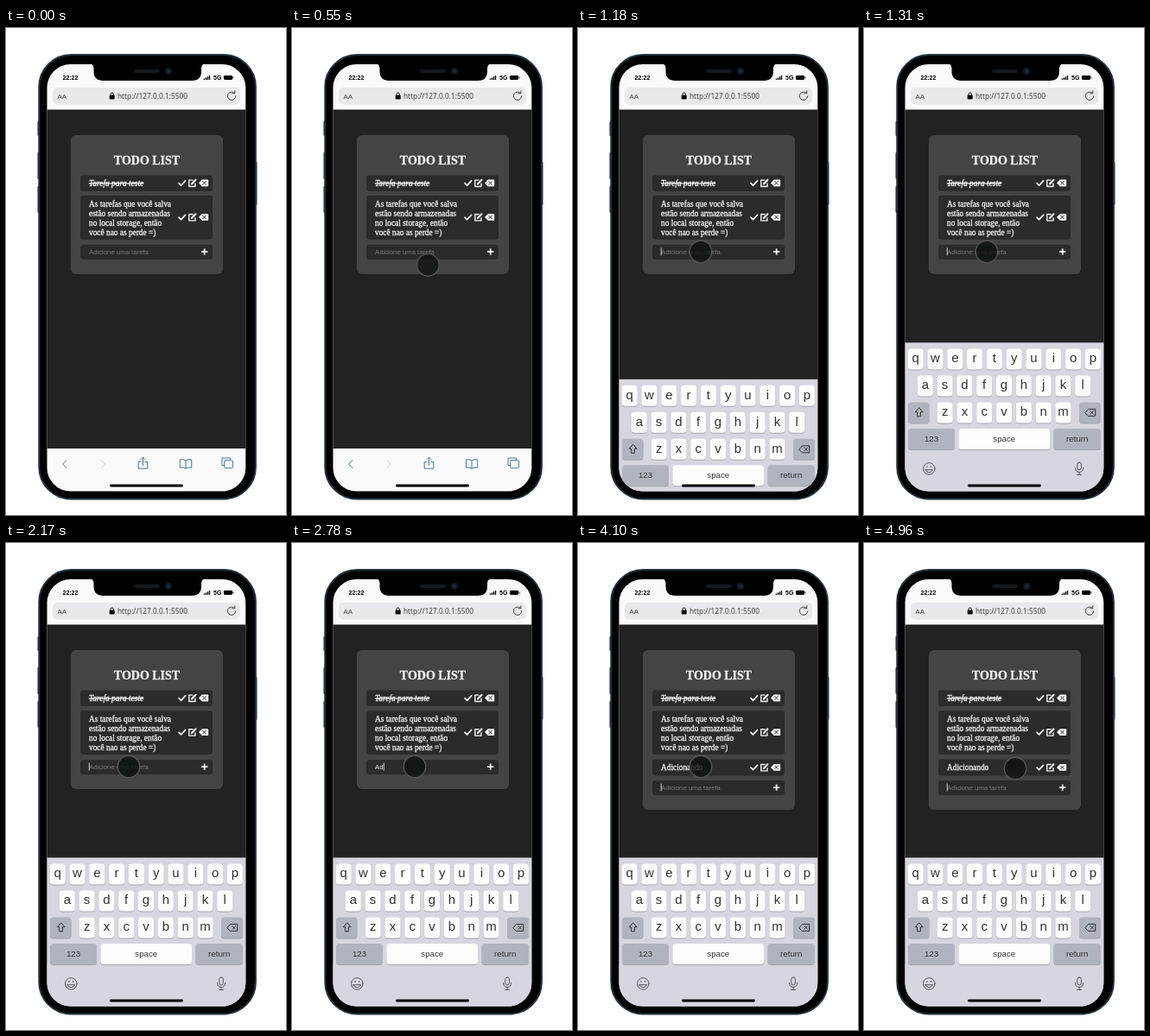
Recreate the animation shown at these times as an HTML page. Size 324 by 564 pixels, loop 5.04 s.

```html
<!DOCTYPE html>
<html lang="pt">
<head>
<meta charset="utf-8">
<style>
  html, body { margin: 0; width: 100%; height: 100%; overflow: hidden; background: #fff; }
  svg { display: block; }
  text { font-family: "Liberation Sans", Arial, sans-serif; }
  .serif { font: 9.35px "Liberation Serif", "Times New Roman", serif; fill: #f4f4f4; stroke: #f4f4f4; stroke-width: .28px; }
  .input { font-size: 7.75px; fill: #f0f0f0; }
  .mid { text-anchor: middle; }
  .line { fill: none; stroke-width: 1; stroke-linecap: round; stroke-linejoin: round; }
</style>
</head>
<body>
<svg width="324" height="564" viewBox="0 0 324 564">
  <defs>
    <clipPath id="screen"><rect x="47.5" y="42" width="229.8" height="494.5" rx="27"/></clipPath>
    <g id="actions" class="line" stroke="#f4f4f4">
      <path d="M200 .2l2.6 2.6 5-5.4" stroke-width="1.7"/>
      <path d="M216-3.4h-4.2v7.4h7.2V.8" stroke-width="1.4"/>
      <path d="M215 1l4.4-4.6" stroke-width="2.2"/>
      <path d="M223 0l3.8-3.9h6.4q1 0 1 1v5.8q0 1-1 1h-6.4z" fill="#f4f4f4" stroke="none"/>
      <path d="M227.8-1.7l3.4 3.4m0-3.4l-3.4 3.4" stroke="#2b2b2b"/>
    </g>
  </defs>

  <g fill="#22323d">
    <rect x="36.5" y="108" width="3" height="17" rx="1"/>
    <rect x="36.5" y="144" width="3" height="31" rx="1"/>
    <rect x="36.5" y="183" width="3" height="31" rx="1"/>
    <rect x="287.5" y="155" width="3" height="50" rx="1"/>
  </g>
  <rect x="38.3" y="31" width="250.6" height="514.5" rx="37" stroke="#22343f" stroke-width="2"/>

  <g clip-path="url(#screen)">
    <rect x="47" y="42" width="231" height="495" fill="#fafafa"/>
    <rect x="54" y="69" width="217" height="19.5" rx="5" fill="#e9e9eb"/>
    <text x="65.5" y="59.7" font-size="7" font-weight="bold">22:22</text>
    <text x="240" y="60" font-size="7" font-weight="bold">5G</text>
    <path d="M229.5 60v-1.5m2 1.5v-2.5m2 2.5v-3.7m2 3.7v-5" stroke="#111" stroke-width="1.4"/>
    <rect x="252" y="55" width="10" height="5" rx="1.2"/>
    <path d="M263 56.5v2" stroke="#111"/>
    <text x="59.5" y="81.7" font-size="8" fill="#444">AA</text>
    <rect x="119.7" y="77.8" width="6" height="4.7" rx=".8"/>
    <path class="line" d="M121 78v-1.3a1.7 1.7 0 0 1 3.4 0v1.3" stroke="#111"/>
    <text x="129" y="81.7" font-size="8.35" fill="#333" style="font-family:'Open Sans',sans-serif">http://127.0.0.1:5500</text>
    <path class="line" d="M264.3 75.3a4.7 4.7 0 1 0 1.5 3.5M264.8 72.8v3h-3" stroke="#444"/>

    <rect x="47" y="94.5" width="231" height="392.5" fill="#222"/>
    <rect id="panel" x="75" y="124" width="176" height="161" rx="6" fill="#444"/>
    <text class="serif mid" x="163" y="157.8" style="font-size:14px;font-weight:bold">TODO LIST</text>

    <g fill="#2b2b2b">
      <rect x="86" y="170.5" width="153" height="18.5" rx="3"/>
      <rect x="86" y="194" width="153" height="51" rx="3"/>
    </g>
    <text class="serif" x="96" y="182.8" style="font-style:italic;text-decoration:line-through">Tarefa para teste</text>
    <g id="note"></g>
    <use href="#actions" y="179.5"/>
    <use href="#actions" y="219.1"/>

    <g id="added">
      <rect x="86" y="250.5" width="153" height="19" rx="3" fill="#2b2b2b"/>
      <text class="serif" x="96" y="263">Adicionando</text>
      <use href="#actions" y="259.9"/>
    </g>
    <g id="field">
      <rect x="86" y="251" width="153" height="17" rx="3" fill="#2b2b2b"/>
      <text id="typed" class="input" x="96" y="261.7"></text>
      <rect id="caret" y="254.5" width=".9" height="9" fill="#e0e0e0"/>
      <path d="M226 259.1h7.4m-3.7-3.7v7.4" stroke="#f4f4f4" stroke-width="1.8"/>
    </g>

    <g class="line" stroke="#467b99">
      <path d="M70 500.5l-4.5 4.5 4.5 4.5"/>
      <path d="M110 500.5l4.5 4.5-4.5 4.5" stroke="#cdd3d8"/>
      <path d="M156 502.5h-2.8v7.7h10.6v-7.7h-2.8M158.5 506.5v-9.3m-2.5 2.4l2.5-2.5 2.5 2.5"/>
      <path d="M208 501q-3-2.2-6.7-1.2v9.4q4-1 6.7 1 2.7-2 6.7-1v-9.4q-3.7-1-6.7 1.2v9"/>
      <path d="M252.5 506.5h-2.5v-8.5h9.5v2.5"/>
      <rect x="252.7" y="500.7" width="9.8" height="9" rx="1"/>
    </g>

    <g id="keyboard">
      <rect x="47" y="365" width="231" height="183" fill="#d5d6df"/>
      <g id="keys"></g>
      <g class="line" stroke="#333">
        <path d="M63.5 440.7l-4.2 4.7h2.3v5h3.8v-5h2.3z"/>
        <path d="M256 446l3.7-4h8v8h-8zM262 444.2l3.5 3.6m0-3.6l-3.5 3.6"/>
      </g>
      <g class="line" stroke="#55575e" stroke-width="1.2">
        <circle cx="75.3" cy="511" r="6.8"/>
        <path d="M71 512.3h8.6q-4.3 6.4-8.6 0zM73 508v1.2m4.6-1.2v1.2"/>
        <rect x="246.8" y="503.5" width="4.6" height="9" rx="2.3"/>
        <path d="M244.5 510q0 5 4.6 5t4.6-5M249.1 515v3m-2.5 0h5"/>
      </g>
    </g>
    <rect x="120" y="528.6" width="85" height="2.8" rx="1.4"/>
  </g>

  <path d="M97 41q4.5 1 4.5 6v3q0 11 11 11h102.500q11 0 11-11v-3q0-5 4.5-6z"/>
  <rect x="148" y="48" width="30" height="4" rx="2" fill="#14191d"/>
  <circle cx="188" cy="50" r="4" fill="#101a24"/>
  <circle cx="188" cy="50" r="1.7" fill="#1d2f44"/>

  <circle id="touch" r="12.8" fill="#0e1113" fill-opacity=".8" stroke="#555" stroke-width="1.4"/>
</svg>

<script>
const $ = id => document.getElementById(id);
const LOOP = 5040;
const WORD = 'Adicionando';
const keyTimes = [2440, 2710, 2800, 2880, 2970, 3170, 3370, 3430, 3570, 3670, 3770];
const SUBMIT = 4100;
// Moments at which the picture refreshes; poses hold in between.
const ticks = [0, 70, 150, 230, 310, 390, 470, 550, 630, 710, 940, 1020, 1110, 1180, 1250, 1310,
  1640, 2170, ...keyTimes, SUBMIT, 4360, 4830, 4900, 4960];

$('note').innerHTML = ['As tarefas que você salva', 'estão sendo armazenadas',
  'no local storage, então', 'você nao as perde =)']
  .map((s, i) => `<text class="serif" x="96" y="${206.5 + i * 11}">${s}</text>`).join('');

const GREY = '#b0b3c0';
const key = (x, y, w, label, size, fill = '#fdfdfe') =>
  `<rect x="${x}" y="${y + 1}" width="${w}" height="24" rx="3.5" fill="#a4a6ad"/>
   <rect x="${x}" y="${y}" width="${w}" height="24" rx="3.5" fill="${fill}"/>
   <text class="mid" x="${x + w / 2}" y="${y + (size > 12 ? 16 : 14.8)}" font-size="${size}" fill="#333">${label}</text>`;
$('keys').innerHTML =
  [['qwertyuiop', 59.7], ['asdfghjkl', 70.8], ['zxcvbnm', 93.7]].map(([row, x], r) =>
    [...row].map((c, i) => key(x + i * 22.8 - 9, 372 + r * 31, 18, c, 15)).join('')).join('') +
  key(51, 434, 24.5, '', 10, GREY) + key(249, 434, 25, '', 10, GREY) +
  key(51, 464.5, 54, '123', 9.7, GREY) + key(109.5, 464.5, 105.5, 'space', 9.7) +
  key(219.5, 464.5, 54.5, 'return', 9.7, GREY);

const clamp = x => Math.min(1, Math.max(0, x));
const move = (el, x, y) => el.setAttribute('transform', `translate(${x} ${y})`);

function draw(time) {
  const t = ticks.findLast(k => k <= time);
  const added = t >= SUBMIT;

  const approach = 115 * (1 - clamp((t - 70) / 640)) ** 1.45;
  const leave = clamp((t - 4770) / 190) ** 2;
  $('touch').style.display = t < 70 ? 'none' : '';
  move($('touch'), 142 + approach + 33 * leave, 259 + approach + 2 * leave);

  const hidden = (1 - clamp((t - 1040) / 270)) ** 2;
  move($('keyboard'), 0, 183 * hidden - .6);

  const count = added ? 0 : keyTimes.filter(k => k <= t).length;
  const typed = $('typed');
  typed.textContent = count ? WORD.slice(0, count) : 'Adicione uma tarefa';
  typed.style.fill = count ? '' : '#777';
  const caretOn = t >= 1110 && !(t >= 1640 && t < 2170) && !(t >= 4360 && t < 4900);
  $('caret').style.display = caretOn ? '' : 'none';
  $('caret').setAttribute('x', count ? 96.3 + typed.getComputedTextLength() : 95.8);

  $('added').style.display = added ? '' : 'none';
  move($('field'), 0, added ? 24 : 0);
  $('panel').setAttribute('height', added ? 185 : 161);
}

function frame() {
  draw(performance.now() % LOOP);
  requestAnimationFrame(frame);
}
frame();
</script>
</body>
</html>
```
